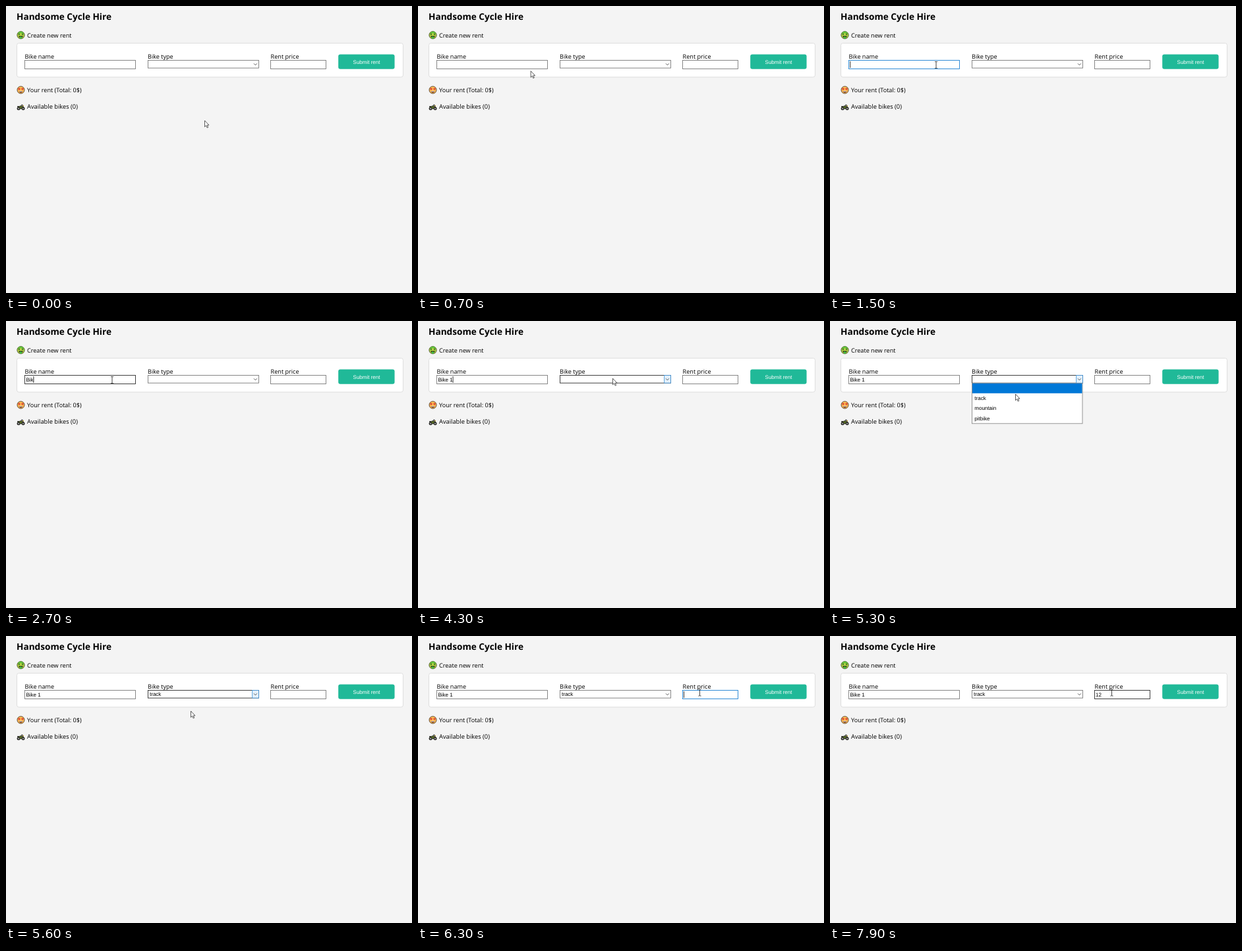
An HTML page that plays this animation: 616 px wide and 436 px high, repeating every 8 s.

```html
<!DOCTYPE html>
<html lang="en">
<head>
<meta charset="utf-8">
<title>Bike rental form</title>
<style>
  html, body { margin: 0; width: 100%; height: 100%; overflow: hidden; background: #f4f4f4; }
  svg { display: block; width: 616px; height: 436px; font-family: "Open Sans", "Noto Sans", sans-serif; text-rendering: geometricPrecision; }
  text { font-size: 9.1px; white-space: pre; }
  .title { font-size: 13.62px; font-weight: 700; }
  .small { font: 8px "Liberation Sans", Arial, sans-serif; }
  .field { fill: #fff; stroke: #7a7a7a; stroke-width: .9; }
  .field.hot { stroke: #2c2c2c; }
  .field.pressed { stroke: #1c80d2; }
</style>
</head>
<body>
<svg viewBox="0 0 616 436">
  <rect width="616" height="436" fill="#f4f4f4"/>
  <text class="title" x="16" y="21.4">Handsome Cycle Hire</text>

  <!-- money face -->
  <g transform="translate(22.5 44.2)">
    <circle r="5.6" fill="#b9d344" stroke="#2c3a1a" stroke-width=".8"/>
    <path d="M-5-2A5.3 5.3 0 0 1 5-2L3.4-3H-3.4Z" fill="#5ec33c"/>
    <path d="M-3.9-1.4h2.6M1.3-1.4h2.6M-2.6-2.8v2.8M2.6-2.8v2.8" stroke="#1d6b22"/>
    <path d="M-3.3 1.4H3.3Q2.6 4.4 0 4.4T-3.3 1.4Z" fill="#26351a"/>
    <rect x="-1.5" y="2.2" width="3" height="3.2" rx="1" fill="#43c948"/>
  </g>
  <text x="32" y="47.8">Create new rent</text>

  <!-- starry face -->
  <g transform="translate(22.5 127.5)">
    <circle r="5.5" fill="#ffbd55" stroke="#3a2618" stroke-width=".8"/>
    <g fill="#dc4a35">
      <path id="star" d="M-2.5-3.8l.7 1.4 1.5.2-1.1 1.1.3 1.6-1.4-.8-1.4.8.3-1.6-1.1-1.1 1.5-.2Z"/>
      <use href="#star" x="5"/>
    </g>
    <path d="M-2.8 1.7H2.8Q2.2 4.2 0 4.2T-2.8 1.7Z" fill="#5a2a20"/>
    <path d="M-2.2 2.2H2.2" stroke="#fff" stroke-width=".9"/>
  </g>
  <text x="32" y="130.9">Your rent (Total: 0$)</text>

  <!-- motorbike -->
  <g transform="translate(22.5 154)" fill="none" stroke="#22221f">
    <circle cx="-3.4" cy="1.8" r="1.9" fill="#999" stroke-width="1.2"/>
    <circle cx="3.5" cy="1.8" r="1.9" fill="#999" stroke-width="1.2"/>
    <path d="M-5.4-1.3L-2-1.6 1-2.6 3 .2 0 2.3-2 .6Z" fill="#566b22"/>
    <path d="M.6-3.8H2.4L4.2.8" stroke-width="1.1"/>
    <path d="M3-2.4h1.5" stroke="#d9b02c" stroke-width="1.2"/>
  </g>
  <text x="32" y="156.3" style="font-size:9.3px">Available bikes (0)</text>

  <rect x="16.5" y="56.5" width="586" height="51.5" rx="3" fill="#fff" stroke="#dedede"/>
  <text x="28.6" y="79.7">Bike name</text>
  <text x="215" y="79.7">Bike type</text>
  <text x="401.6" y="79.7">Rent price</text>
  <rect x="504.2" y="73.4" width="85.4" height="22.3" rx="3" fill="#20b998"/>
  <text class="small" x="547" y="87.5" text-anchor="middle" fill="#fff">Submit rent</text>

  <rect id="nameBox" class="field" x="28.5" y="82.5" width="168" height="13"/>
  <text id="nameText" class="small" x="30.4" y="91.9"></text>
  <rect id="nameCaret" y="84" width=".8" height="10"/>

  <rect id="typeBox" class="field" x="215.5" y="82.5" width="168" height="11.7"/>
  <rect id="typeButton" x="373.7" y="82.5" width="9.8" height="11.7" fill="#e3f0fb" stroke="#3b91d8" stroke-width=".8"/>
  <path d="M376 87.4l2.4 2.4 2.4-2.4" fill="none" stroke="#444" stroke-width=".9"/>
  <text id="typeText" class="small" x="218" y="91.3"></text>

  <rect id="priceBox" class="field" x="401.5" y="82.5" width="84" height="13"/>
  <text id="priceText" class="small" x="403.1" y="91.9"></text>
  <rect id="priceCaret" y="84" width=".8" height="10"/>

  <g id="menu">
    <rect x="215.5" y="94.5" width="167.5" height="61.3" fill="#fff" stroke="#8a8a8a" stroke-width=".9"/>
    <rect id="highlight" x="216" width="166.5" height="15" fill="#0078d7"/>
    <text id="trackItem" class="small" x="219.3" y="120">track</text>
    <text class="small" x="219.3" y="135.3">mountain</text>
    <text class="small" x="219.3" y="150.6">pitbike</text>
  </g>

  <path id="arrow" d="M.5 0V9.6L2.7 7.5 4.2 11 5.7 10.3 4.2 7H7Z" fill="#fff" stroke="#333" stroke-width=".8"/>
  <path id="beam" d="M-2-5H-.5L0-4.5.5-5H2M0-4.5V4.5M-2 5H-.5L0 4.5.5 5H2" fill="none" stroke="#222" stroke-width=".85"/>
</svg>
<script>
const LOOP = 8000, STEP = 100;
const $ = id => document.getElementById(id);

// Pointer hotspot: [time, x, y]
const pointer = [
  [0, 301, 174], [100, 301, 174], [800, 163, 94.3], [900, 161, 93.8],
  [1100, 161, 93.8], [1200, 161, 89.5], [3800, 161, 89.5], [4300, 295, 87.2],
  [4800, 295, 87.2], [5300, 281, 111], [5600, 280, 114], [5700, 289, 109],
  [6100, 427.5, 86], [LOOP, 427.5, 86]
];
const nameTyping = [[0, ''], [2400, 'B'], [2600, 'Bi'], [2700, 'Bik'], [2900, 'Bike'], [3400, 'Bike 1']];
const priceTyping = [[0, ''], [7400, '1'], [7500, '12']];
const nameCaretOn = [[1500, 2000], [2400, 3100], [3400, 3600], [4100, 4500]];
const priceCaretOn = [[6300, 6900], [7400, 7900]];

const within = (v, a, b) => v >= a && v < b;
const show = (id, on) => $(id).setAttribute('visibility', on ? 'visible' : 'hidden');
const latest = (list, t) => list.filter(([start]) => start <= t).pop()[1];

function pointerAt(t) {
  const i = pointer.findIndex(k => k[0] > t);
  const [t0, x0, y0] = pointer[i - 1], [t1, x1, y1] = pointer[i];
  const u = (t - t0) / (t1 - t0), s = u * u * (3 - 2 * u);
  return [x0 + (x1 - x0) * s, y0 + (y1 - y0) * s];
}

function drawInput(id, t, typing, caretOn, hover, pressTime) {
  const text = $(id + 'Text');
  text.textContent = latest(typing, t);
  $(id + 'Caret').setAttribute('x', Number(text.getAttribute('x')) + text.getComputedTextLength());
  show(id + 'Caret', caretOn.some(([a, b]) => within(t, a, b)));
  const state = t === pressTime ? 'pressed' : hover ? 'hot' : '';
  $(id + 'Box').setAttribute('class', 'field ' + state);
}

function draw(t) {
  const [x, y] = pointerAt(t);
  const overRow = within(y, 82, 96);
  const overName = overRow && within(x, 28, 197);
  const overPrice = overRow && within(x, 401, 486);
  drawInput('name', t, nameTyping, nameCaretOn, overName, 1500);
  drawInput('price', t, priceTyping, priceCaretOn, overPrice, 6300);

  const open = within(t, 4500, 5500);
  const typeHot = within(t, 4500, 5700) || within(y, 82, 94) && within(x, 215, 384);
  $('typeBox').setAttribute('class', typeHot ? 'field hot' : 'field');
  show('typeButton', typeHot);
  $('typeText').textContent = t >= 5500 ? 'track' : '';
  show('menu', open);
  const onTrack = t >= 5400;
  $('highlight').setAttribute('y', onTrack ? 110 : 94.8);
  $('trackItem').setAttribute('fill', onTrack ? '#fff' : '#000');

  const beam = overName || overPrice;
  for (const id of ['arrow', 'beam']) $(id).setAttribute('transform', `translate(${x} ${y})`);
  show('beam', beam);
  show('arrow', !beam);
}

const start = performance.now();
function tick() {
  const t = Math.max(0, performance.now() - start) % LOOP;
  draw(Math.floor(t / STEP) * STEP);
  requestAnimationFrame(tick);
}
tick();
</script>
</body>
</html>
```
